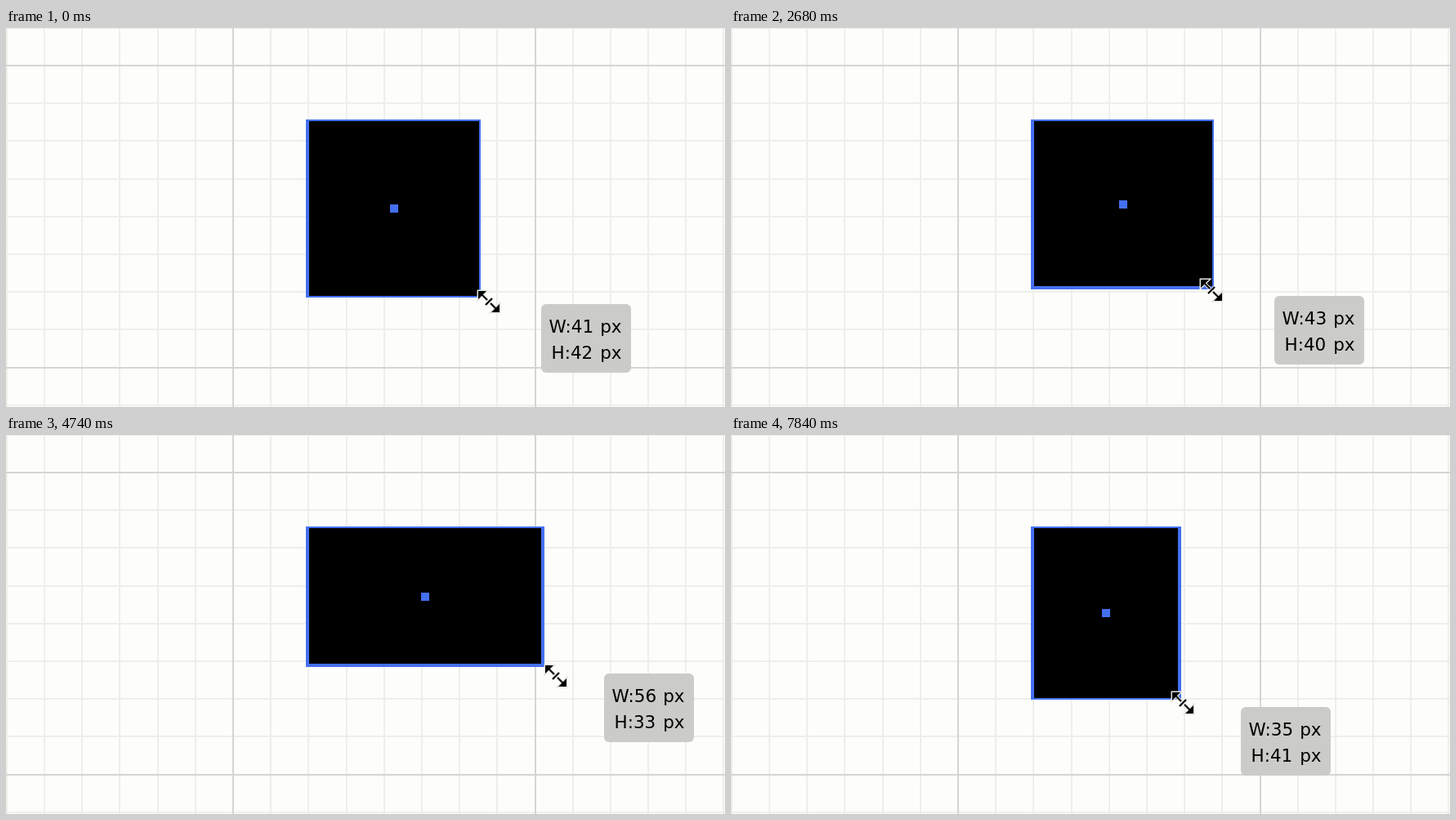
Recreate the animation shown at these times as an HTML page with a canvas. Size 880 by 464 pixels, loop 8000 ms.

```html
<!DOCTYPE html>
<html lang="en">
<head>
<meta charset="utf-8">
<title>Drag to resize</title>
<style>
  html, body { margin: 0; width: 880px; height: 464px; overflow: hidden; }
  canvas { display: block; }
</style>
</head>
<body>
<canvas id="stage" width="880" height="464"></canvas>
<script>
const ctx = document.getElementById('stage').getContext('2d');
const LOOP = 8000, STEP = 20, LAG = 50, GRAB = 6;
const LEFT = 369, TOP = 113, UNIT_X = 5.14, UNIT_Y = 5.13, CELL = 46.19;
const BLUE = '#4470f0';

// Points the pointer passes: time, x, y. A repeated place is a rest.
const path = [
  [-400, 551, 323], [0, 591, 335], [780, 698, 389],
  [1340, 771, 411], [1680, 771, 411],
  [2120, 664, 360], [2480, 615, 338], [3340, 515, 260],
  [3640, 500, 250], [3900, 500, 250],
  [4740, 673, 295],
  [5700, 756, 433], [5960, 756, 433],
  [7800, 553, 328], [LOOP, 553, 328]
];

// Smooth speed through a point; zero where the motion rests or turns
function speed(i, n) {
  if (!path[i - 1] || !path[i + 1]) return 0;
  const [a, b, c] = path.slice(i - 1, i + 2);
  const before = b[0] - a[0], after = c[0] - b[0];
  const v = (b[n] - a[n]) / before, w = (c[n] - b[n]) / after;
  return v * w <= 0 ? 0 : (v * after + w * before) / (before + after);
}

function pointer(t) {
  const j = path.findIndex(p => p[0] > t), i = j - 1;
  const a = path[i], b = path[j], span = b[0] - a[0];
  const u = (t - a[0]) / span, r = 1 - u;
  return [1, 2].map(n =>
    a[n] + (b[n] - a[n]) * u * u * (3 - 2 * u)
    + span * u * r * (speed(i, n) * r - speed(j, n) * u));
}

function box(color, x0, y0, x1, y1) {
  ctx.fillStyle = color;
  ctx.fillRect(x0, y0, x1 - x0, y1 - y0);
}

function drawGrid() {
  box('#fdfdfc', 0, 0, 880, 464);
  for (const major of [false, true]) {
    const color = major ? '#d5d5d3' : '#efefe9';
    for (let k = -6; k <= 13; k++) {
      if ((k % 8 === 0) !== major) continue;
      const at = Math.round(k * CELL);
      box(color, 277 + at, 0, 279 + at, 464);
      box(color, 0, 45 + at, 880, 47 + at);
    }
  }
}

// A two pixel edge, widened to whole blocks of the doubled pixel grid
function edge(at, offset) {
  const lo = Math.floor((at - 0.45 - offset) / 2) * 2 + offset;
  const hi = Math.ceil((at + 0.45 - offset) / 2) * 2 + offset;
  return [lo, hi];
}

function drawShape(right, bottom) {
  const [l0, l1] = edge(LEFT, 1), [r0, r1] = edge(right, 1);
  const [t0, t1] = edge(TOP, 0), [b0, b1] = edge(bottom, 0);
  box(BLUE, l0, t0, r1, b1);
  box('#000', l1, t1, r0, b0);
  const cx = Math.round((LEFT + right + 1) / 2), cy = Math.round((TOP + bottom) / 2);
  box(BLUE, cx - 5, cy - 5, cx + 5, cy + 5);
}

function drawCursor(x, y) {
  const heads = new Path2D('M-13-13h10l-10 10zM13 13h-10l10-10z');
  const lines = new Path2D('M-9-9L-2-2M2 2L9 9M-4 4L4-4');
  ctx.save();
  ctx.translate(Math.round(x), Math.round(y));
  ctx.strokeStyle = '#e4e4e0';
  ctx.lineWidth = 4;
  ctx.stroke(lines);
  ctx.lineWidth = 3;
  ctx.stroke(heads);
  ctx.fillStyle = ctx.strokeStyle = '#000';
  ctx.lineWidth = 2;
  ctx.fill(heads);
  ctx.stroke(lines);
  ctx.restore();
}

function drawTip(x, y, w, h) {
  ctx.beginPath();
  ctx.roundRect(x, y, 110, 84, 6);
  ctx.fillStyle = '#cbcbc9';
  ctx.fill();
  ctx.fillStyle = '#000';
  ctx.font = '21.5px "DejaVu Sans", sans-serif';
  const row = (text, textX, baseline) => {
    ctx.textAlign = 'left';
    ctx.fillText(text, x + textX, y + baseline);
    ctx.textAlign = 'right';
    ctx.fillText('px', x + 98.5, y + baseline);
  };
  row('W:' + w, 9.5, 35);
  row('H:' + h, 12.5, 67);
}

function draw(now) {
  const t = Math.floor(now % LOOP / STEP) * STEP;
  const [x, y] = pointer(t), [px, py] = pointer(t - LAG);
  // The shape trails the pointer and snaps to whole units
  const w = Math.round((px - GRAB - LEFT) / UNIT_X);
  const h = Math.round((py - GRAB - TOP) / UNIT_Y);
  const right = LEFT + w * UNIT_X, bottom = TOP + h * UNIT_Y;
  drawGrid();
  drawShape(right, bottom);
  drawTip(Math.round(right + 75), Math.round(bottom + 10), w, h);
  drawCursor(x, y);
}

const start = performance.now();
function frame() {
  draw(performance.now() - start);
  requestAnimationFrame(frame);
}
frame();
</script>
</body>
</html>
```
